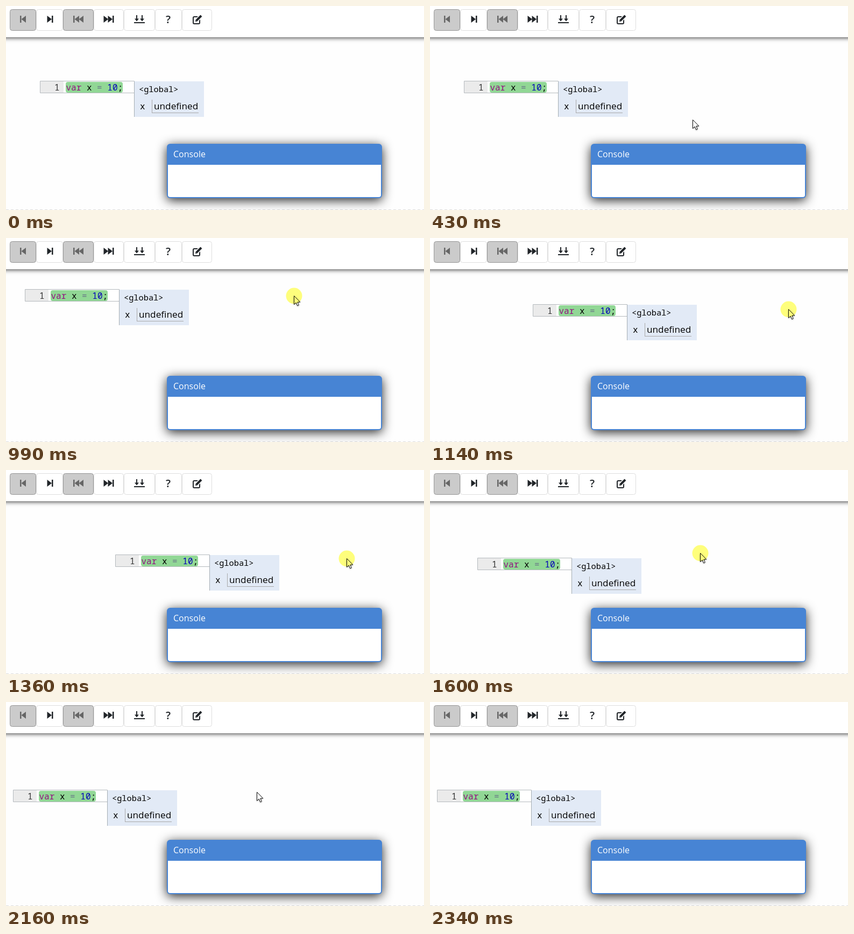
Recreate the animation shown at these times as an HTML page with a canvas. Size 777 by 379 pixels, loop 2930 ms.

```html
<!DOCTYPE html>
<html lang="en">
<head>
<meta charset="utf-8">
<title>Program stepper</title>
<style>
  html, body { margin: 0; width: 100%; height: 100%; overflow: hidden; background: #fefefe; }
  canvas { display: block; }
</style>
</head>
<body>
<canvas id="stage" width="777" height="379"></canvas>
<script>
const ctx = document.getElementById('stage').getContext('2d');
const LOOP = 2930, ENTER = 130, PRESS = 620, RELEASE = 1930, LEAVE = 2160, EXIT = 2340;
const REFRESH = 30;
const HOME = { x: 63, y: 140 }, GRAB = { x: 514, y: 143 };
const SANS = '"Open Sans", "Noto Sans", sans-serif';
const MONO = '"Noto Sans Mono", "DejaVu Sans Mono", monospace';

const key = (t, x, y) => ({ t, x, y });
const ENTRY = [key(ENTER, 577, 352), key(470, 478, 186), key(PRESS, GRAB.x, GRAB.y)];
const DRAG = [
  key(650, GRAB.x, GRAB.y), key(780, 436, 159), key(960, 486, 99), key(990, 535, 107),
  key(1230, 714, 146), key(1360, 633, 164), key(1570, 539, 167), key(1600, 502, 154),
  key(1760, 490, 130), key(1840, 469, 163), key(1900, 464, 167)
];
const LEAVING = [key(LEAVE - REFRESH, 464, 167), key(2250, 572, 222), key(2310, 606, 356)];

// Smooth curve through the keys, at rest at both ends
function along(keys, time) {
  const last = keys.length - 1;
  const t = Math.min(Math.max(time, keys[0].t), keys[last].t);
  const i = Math.max(1, keys.findIndex(k => k.t >= t));
  const a = keys[i - 1], b = keys[i], span = b.t - a.t, s = (t - a.t) / span;
  const slope = (n, axis) => n === 0 || n === last ? 0
    : (keys[n + 1][axis] - keys[n - 1][axis]) / (keys[n + 1].t - keys[n - 1].t);
  const ease = s * s * (3 - 2 * s);
  const blend = axis => a[axis] + (b[axis] - a[axis]) * ease
    + span * s * (1 - s) * ((1 - s) * slope(i - 1, axis) - s * slope(i, axis));
  return { x: blend('x'), y: blend('y') };
}

function pointerAt(t) {
  return along(t < PRESS ? ENTRY : t < RELEASE ? DRAG : LEAVING, t);
}

// The screen refreshes in beats, with one late beat before 1270 ms.
function snap(t) {
  const base = t < 1270 ? 720 : 1270;
  return base + Math.floor((t - base) / REFRESH) * REFRESH;
}

function rect(x, y, w, h, fill) {
  ctx.fillStyle = fill;
  ctx.fillRect(x, y, w, h);
}

function rounded(x, y, w, h, r, fill, stroke, lineWidth = 1) {
  ctx.beginPath();
  ctx.roundRect(x, y, w, h, r);
  if (fill) { ctx.fillStyle = fill; ctx.fill(); }
  if (stroke) { ctx.strokeStyle = stroke; ctx.lineWidth = lineWidth; ctx.stroke(); }
}

function poly(points, fill) {
  ctx.beginPath();
  points.forEach(([x, y]) => ctx.lineTo(x, y));
  ctx.closePath();
  ctx.fillStyle = fill;
  ctx.fill();
}

function line(x1, y1, x2, y2, width, color) {
  ctx.beginPath();
  ctx.moveTo(x1, y1);
  ctx.lineTo(x2, y2);
  ctx.lineWidth = width;
  ctx.strokeStyle = color;
  ctx.stroke();
}

function text(str, x, y, size, family, color, weight = 400) {
  ctx.font = `${weight} ${size}px ${family}`;
  ctx.fillStyle = color;
  ctx.fillText(str, x, y);
  return x + ctx.measureText(str).width;
}

function withShadow(color, blur, dy, draw) {
  ctx.save();
  ctx.shadowColor = color;
  ctx.shadowBlur = blur;
  ctx.shadowOffsetY = dy;
  draw();
  ctx.restore();
}

// Skip icon: a bar with one or two triangles, mirrored by dir
function skipIcon(cx, dir, count, color) {
  const half = count === 1 ? 5.5 : 9.5, size = 8.5;
  ctx.save();
  ctx.translate(cx, 24.5);
  ctx.scale(dir, 1);
  rect(half - 2.5, -6.5, 2.5, 13, color);
  for (let i = 0; i < count; i++) {
    const x = -half + i * (size - 0.5);
    poly([[x, -6.5], [x + size, 0], [x, 6.5]], color);
  }
  ctx.restore();
}

function downIcon(cx, color) {
  for (const x of [cx - 5, cx + 5]) {
    rect(x - 1, 17, 2, 10, color);
    poly([[x - 4, 23.5], [x + 4, 23.5], [x, 28.5]], color);
  }
  rect(cx - 10, 30, 20, 2, color);
}

function editIcon(x, y, color) {
  rounded(x - 7, y - 5, 12, 13, 2, null, color, 2);
  line(x - 2, y + 3, x + 9, y - 8, 7, '#fff');
  line(x - 1, y + 2, x + 8, y - 7, 4, color);
  poly([[x - 3, y + 4], [x - 2.4, y + 0.6], [x + 0.4, y + 3.4]], color);
}

function toolbar() {
  withShadow('rgba(0,0,0,.8)', 8, 1, () => rect(-20, -20, 817, 78, '#fff'));
  const edges = [7, 56, 106, 163, 219, 277, 327, 383];
  const ink = '#212529', dim = '#666';
  for (let i = 0; i < 7; i++) {
    const off = i === 0 || i === 2;
    rounded(edges[i] + 0.5, 6.5, edges[i + 1] - edges[i] - 1, 39, 4,
      off ? '#cbcbcb' : '#fff', off ? '#969696' : '#dedede');
  }
  skipIcon(31.5, -1, 1, dim);
  skipIcon(82, 1, 1, ink);
  skipIcon(134.5, -1, 2, dim);
  skipIcon(191, 1, 2, ink);
  downIcon(248, ink);
  text('?', 297, 31.5, 20, SANS, ink, 600);
  editIcon(355, 25, ink);
}

function consolePanel() {
  const blue = '#4784d4';
  withShadow('rgba(0,0,0,.85)', 20, 4, () => rounded(299, 256, 400, 101, 6, blue));
  rounded(301, 295, 396, 60, 4, '#fff');
  rect(301, 295, 396, 6, '#fff');
  text('Console', 311, 281, 16, SANS, '#fff');
}

function editor(x, y) {
  ctx.save();
  ctx.translate(Math.round(x), Math.round(y));
  rounded(0.5, -0.5, 175, 22, 0, '#fff', '#b4b9bd');
  rect(1, 0, 43, 21, '#ebebeb');
  text('1', 27, 17, 16, MONO, '#333');
  rounded(48, 1, 106, 20, 4, '#91d795');
  const tokens = [['var', '#930f80'], [' x ', '#000'], ['=', '#687687'], [' 10', '#0000b8'], [';', '#000']];
  tokens.reduce((left, [str, color]) => text(str, left, 17, 16, MONO, color), 48.5);

  rect(175, 0, 130, 66, '#e2eaf6');
  rect(175, 0, 1, 66, '#a5adb3');
  text('<global>', 184, 20, 15.3, MONO, '#000');
  text('x', 186, 52, 16, MONO, '#000');
  rect(208, 34, 1, 25, '#a9a9a9');
  rect(208, 58, 87, 1, '#a9a9a9');
  text('undefined', 212, 52, 17.2, SANS, '#000');
  ctx.restore();
}

function pointer(x, y, pressed) {
  const arrow = [[0, 0], [0, 16], [3.7, 12.6], [6.3, 18.4], [8.8, 17.3], [6.3, 11.6], [11.3, 11.6]];
  ctx.save();
  ctx.translate(Math.round(x) + 0.5, Math.round(y) + 0.5);
  withShadow('rgba(0,0,0,.45)', 3, 1, () => poly(arrow, '#fff'));
  ctx.strokeStyle = '#111';
  ctx.lineWidth = 1;
  ctx.stroke();
  if (pressed) {
    ctx.globalCompositeOperation = 'multiply';
    ctx.beginPath();
    ctx.arc(0, 0, 15, 0, Math.PI * 2);
    ctx.fillStyle = '#ffff7c';
    ctx.fill();
  }
  ctx.restore();
}

function draw(time) {
  const now = snap(time);
  // The dragged block trails the pointer by one refresh.
  const held = along(DRAG, now - REFRESH);

  rect(0, 0, 777, 379, '#fefefe');
  for (let x = 0; x < 777; x += 9) rect(x, 378, 5, 1, '#dcdcdc');
  toolbar();
  editor(HOME.x + held.x - GRAB.x, HOME.y + held.y - GRAB.y);
  consolePanel();
  if (time >= ENTER && time < EXIT) {
    const { x, y } = pointerAt(now);
    pointer(x, y, time >= PRESS && time < RELEASE);
  }
}

const start = performance.now();
function tick() {
  draw((performance.now() - start) % LOOP);
  requestAnimationFrame(tick);
}
tick();
</script>
</body>
</html>
```
